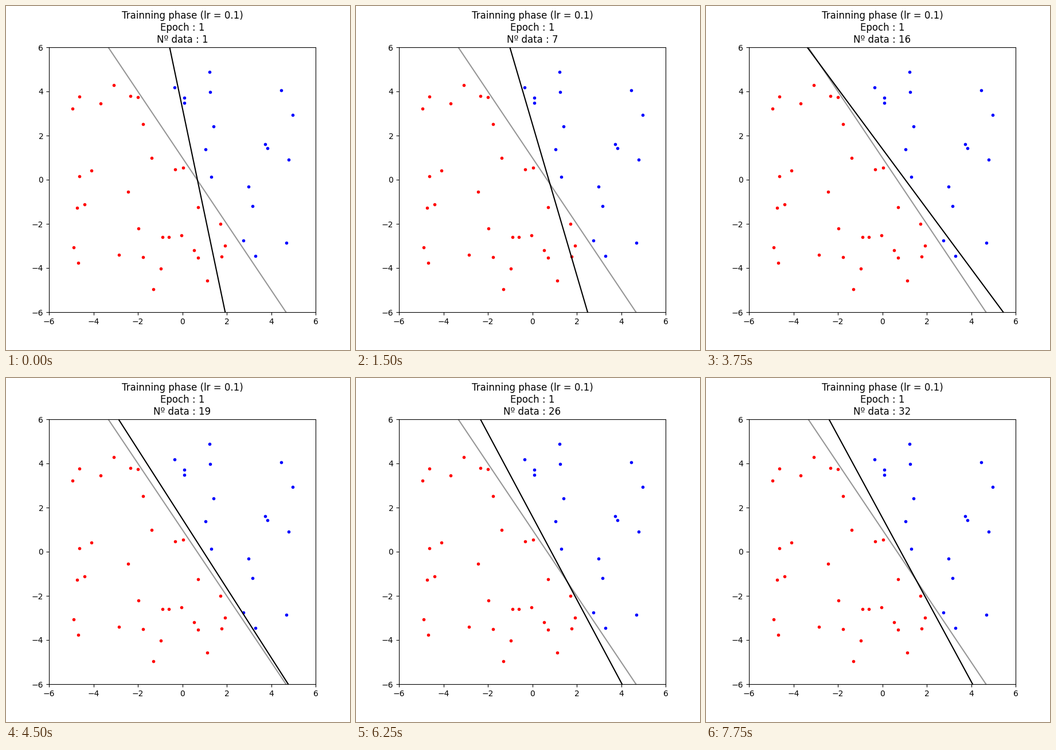
Animation of 600 by 600 pixels, one loop 8 s. Source, as a matplotlib script:

```python
import numpy as np
import matplotlib.pyplot as plt
from matplotlib.animation import FuncAnimation

FRAMES = 32
INTERVAL = 250
LIMIT = 6
N_RED, N_BLUE = 32, 18

# Key poses: sample number, then the boundary's x at the top and bottom
POSES = np.array([
    (1, -0.57, 1.93), (7, -1.01, 2.49), (11, -2.14, 3.87), (16, -3.38, 5.445),
    (22, -2.36, 4.09), (26, -2.335, 4.04), (32, -2.40, 4.065),
])


def true_line(x):
    return 1 - 1.5 * x


def make_data(seed=7):
    """Scatter points evenly and split them by the side of the true line."""
    cloud = np.random.default_rng(seed).uniform(-5, 5, (200, 2))
    above = cloud[:, 1] > true_line(cloud[:, 0])
    return cloud[~above][:N_RED], cloud[above][:N_BLUE]


def boundary(sample):
    """Return the ends of the learned line, extended past the axes."""
    top, bottom = (np.interp(sample, POSES[:, 0], POSES[:, i]) for i in (1, 2))
    mid, half = (top + bottom) / 2, (bottom - top) / 2
    return [mid - 1.2 * half, mid + 1.2 * half], [1.2 * LIMIT, -1.2 * LIMIT]


fig, ax = plt.subplots(figsize=(6, 6), dpi=100)
ax.set_xlim(-LIMIT, LIMIT)
ax.set_ylim(-LIMIT, LIMIT)

x = np.array([-LIMIT, LIMIT])
ax.plot(x, true_line(x), color="#969696")
for points, style in zip(make_data(), ("r.", "b.")):
    ax.plot(*points.T, style)
line, = ax.plot([], [], "k")


def update(frame):
    sample = frame + 1
    line.set_data(*boundary(sample))
    ax.set_title(f"Trainning phase (lr = 0.1)\nEpoch : 1\nNº data : {sample}")
    return line,


anim = FuncAnimation(fig, update, frames=FRAMES, interval=INTERVAL,
                     repeat=True, repeat_delay=0)
plt.show()
```
